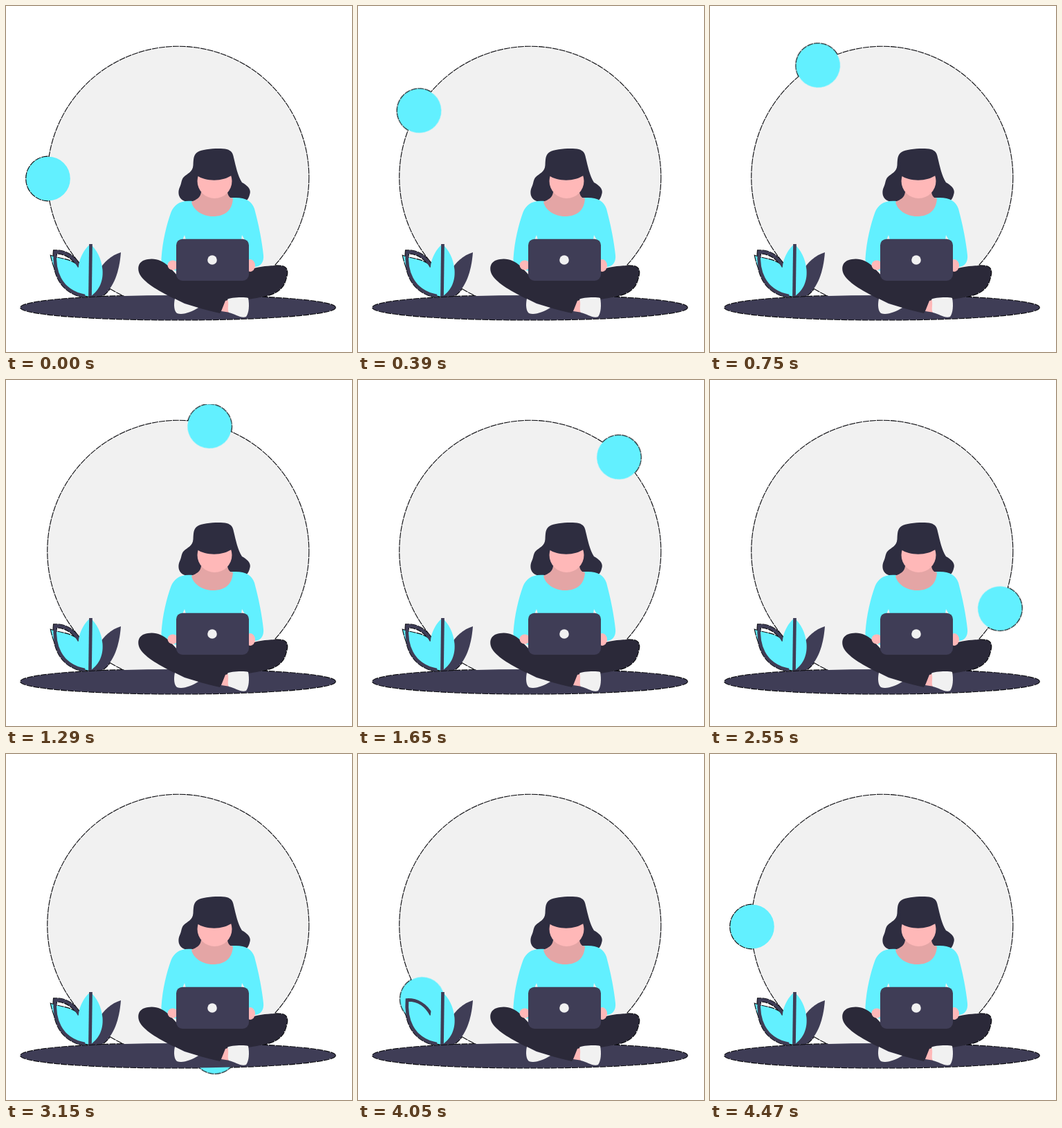
Animation, 500 px wide and 500 px high, one loop 4.53 s. Source, as an HTML page without scripts:

```html
<!DOCTYPE html>
<html lang="en">
<head>
<meta charset="utf-8">
<title>Working on a laptop</title>
<style>
  html, body { margin: 0; width: 100%; height: 100%; overflow: hidden; background: #fff; }
  svg { display: block; width: 100%; height: 100%; }

  .cyan { fill: #62f0ff; }
  .navy { fill: #3f3d56; }
  .dark { fill: #2e2d40; }
  .cloth { fill: #2b2939; }
  .skin { fill: #ffb8b8; }
  .shade { fill: #e4a5a5; }
  .pale { fill: #f1f1f1; }
  .stem { fill: none; stroke: #3f3d56; stroke-width: 4.7; }
  .rim { fill: none; stroke: #0c0c10; stroke-width: 2.2; stroke-dasharray: 9 1; }

  .orbit {
    transform-origin: 249px 249.5px;
    animation: orbit 4530ms infinite;
  }
  /* One turn in 4470 ms, then a 60 ms rest */
  @keyframes orbit {
    0% { transform: rotate(0deg); animation-timing-function: steps(149, end); }
    98.6755%, 100% { transform: rotate(360deg); }
  }
</style>
</head>
<body>
<svg viewBox="0 0 500 500">
  <defs>
    <clipPath id="view"><rect y="35" width="500" height="430"/></clipPath>
    <circle id="disc" cx="248.800" cy="247.300" r="188.500"/>
    <circle id="ball" cx="61" cy="249.500" r="31.800"/>
    <ellipse id="ground" cx="248.500" cy="435.700" rx="227.300" ry="17.800"/>
    <path id="leafRight" d="M166 356C164 383 156 408 139 419L122 420C124 396 137 365 166 356Z"/>
    <path id="leafLeft" d="M65 361C78 366 97 365 107 379L122 420C96 417 72 397 65 361Z"/>
    <path id="leafEdge" d="M106 377C98 362 85 355 71 355.500C69 380 76 412 114 419"/>
    <path id="legs" d="M205 366C216 364 226 368 235 376L250 392H345L352 381C366 376 386 374 399 376C405 377 407 382 406 388C404 397 402 403 398 407C390 417 370 421 350 424L320 426L309 444C290 440 262 432 243 423C225 414 201 401 194 389C189 380 190 368 205 366Z"/>
  </defs>

  <!-- Ragged rims, seen only against the white -->
  <g class="rim">
    <use href="#disc"/>
    <g clip-path="url(#view)"><use href="#ball" class="orbit"/></g>
    <use href="#ground"/>
    <use href="#leafLeft"/>
    <use href="#leafRight"/>
    <use href="#leafEdge" stroke-width="6.500"/>
    <use href="#legs"/>
  </g>

  <use href="#disc" class="pale"/>
  <g clip-path="url(#view)"><use href="#ball" class="orbit cyan"/></g>
  <use href="#ground" class="navy"/>

  <g id="plant">
    <use href="#leafRight" class="navy"/>
    <use href="#leafLeft" class="cyan"/>
    <use href="#leafEdge" class="stem"/>
    <path class="cyan" d="M122 344C113 351 104 367 105 381C106 400 114 414 122 420C133 412 141 400 139.500 381C138 365 131 352 122 344Z"/>
    <path class="stem" d="M122.500 344L121.500 420"/>
  </g>

  <g id="woman">
    <path class="dark" d="M277 211C285 206 310 205 319 207C326 209 328 213 329 219C332 231 335 246 341 255C350 260 354 265 352.500 271C351 278 348 282 343 284C339 280 332 277 320 277L280 280C272 284 262 284 256 281C249 277 248 269 251 262C254 256 253 251 257 247C262 242 270 240 270.500 230C271 220 271 215 277 211Z"/>
    <path class="cyan" d="M270 282C252 280 243 287 238.500 298C232 316 226 340 224.500 365C224 374 228 378 236 378L250 385H345L359 377C368 377 373 370 372 360C370 340 365 315 359 293C355 281 345 276 328 277L300 285Z"/>
    <path class="shade" d="M268 283C275 280 281 277 282 269H320C321 275 324 278 328 278C327 296 316 304 299 304C283 304 270 294 268 283Z"/>
    <circle class="skin" cx="301.500" cy="253" r="25"/>
    <path class="dark" d="M275 225H328L327 244C314 254 289 254 276 245Z"/>
    <path class="pale" d="M255 338L258 331L260 338ZM340 338L341 331L345 338Z"/>
    <use href="#legs" class="cloth"/>
    <path class="pale" d="M244 423C242 432 243 441 247 444C256 447 268 442 278 436L258 430Z"/>
    <path class="skin" d="M317 426L324 424V443L311 441Z"/>
    <path class="pale" d="M320 424C323 421 345 420 350 422C352 432 351 444 347 449C340 452 331 445 322 443C319 438 323 430 320 424Z"/>
    <ellipse class="skin" cx="241" cy="374.500" rx="7.500" ry="7"/>
    <ellipse class="skin" cx="353" cy="375" rx="7" ry="9"/>
    <rect class="navy" x="246" y="336.700" width="105" height="60.300" rx="9"/>
    <circle class="pale" cx="298" cy="367" r="6.800"/>
  </g>
</svg>
</body>
</html>
```
